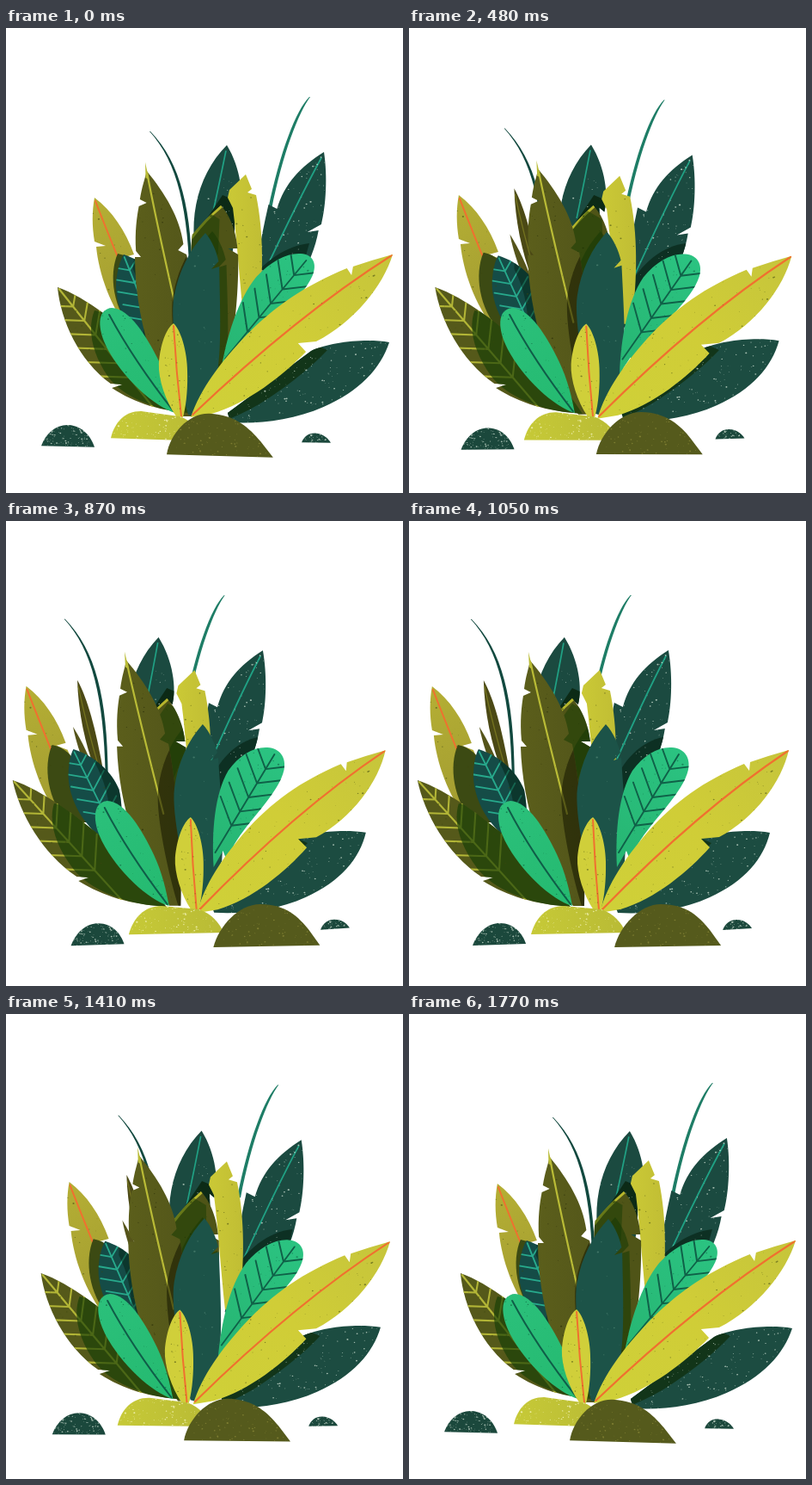
Write an HTML page with a canvas that moves like this. It is 462 px wide and 540 px high and loops after 1800 ms.

```html
<!DOCTYPE html>
<html lang="en">
<head>
<meta charset="utf-8">
<title>Swaying plant</title>
<style>
  html, body { margin: 0; width: 100%; height: 100%; overflow: hidden; background: #fff; }
  canvas { display: block; width: 462px; height: 540px; }
</style>
</head>
<body>
<canvas id="stage" width="462" height="540"></canvas>
<script>
const ctx = document.getElementById('stage').getContext('2d');
const LOOP = 1800, STEP = 30, REST = 0.955;
const shapes = [];

function random(seed) {
  return () => {
    seed = (seed * 1664525 + 1013904223) >>> 0;
    return seed / 4294967296;
  };
}

// Fine printed texture, spread over the bounding box of an outline.
function makeGrain(d, count, seed) {
  const rnd = random(seed), path = new Path2D();
  const n = d.match(/-?[\d.]+/g).map(Number);
  const xs = n.filter((_, i) => i % 2 === 0), ys = n.filter((_, i) => i % 2);
  const x0 = Math.min(...xs), y0 = Math.min(...ys);
  const w = Math.max(...xs) - x0, h = Math.max(...ys) - y0;
  for (let i = 0; i < count; i++) {
    const r = 0.35 + rnd() * rnd() * 0.9;
    const x = x0 + rnd() * w, y = y0 + rnd() * h;
    path.moveTo(x + r, y);
    path.ellipse(x, y, r, r * 0.8, 0, 0, 7);
  }
  return path;
}

// A midrib from tip to base with slanted side veins.
function ribs(x0, y0, x1, y1, count, left, right, spread = 0.8) {
  const a = Math.atan2(y0 - y1, x0 - x1);
  let d = `M${x0},${y0}L${x1},${y1}`;
  for (let i = 0; i < count; i++) {
    const t = 0.15 + i * 0.72 / count;
    const x = x0 + (x1 - x0) * t, y = y0 + (y1 - y0) * t;
    for (const [len, turn] of [[left, -spread], [right, spread]])
      d += `M${x},${y}L${x + len * Math.cos(a + turn)},${y + len * Math.sin(a + turn)}`;
  }
  return d;
}

// move: [top y, top shift, bottom y, bottom shift, lift, tilt, tilt centre]
function add(d, fill, move, extra = {}) {
  const s = { d, path: new Path2D(d), fill, move, ...extra };
  if (s.vein) s.veinPath = new Path2D(s.vein);
  if (s.grain) s.grainPath = makeGrain(d, s.grain, shapes.length * 977 + 31);
  (s.shade || []).forEach(h => h.path = new Path2D(h.d));
  shapes.push(s);
}

function blend(x0, y0, x1, y1, ...colors) {
  const g = ctx.createLinearGradient(x0, y0, x1, y1);
  colors.forEach((c, i) => g.addColorStop(i / (colors.length - 1), c));
  return g;
}

const LIGHT = 'rgba(225,240,225,.7)', DARK = 'rgba(60,70,15,.55)';
const teal = '#1b4a40', lime = '#b9bb36', orange = '#f0702f';

const center = 'M229,236C238,246 243,258 246,269L238,278L247,275C250,320 254,365 251,395L226,449' +
  'L219,447C208,412 192,340 196,310C200,280 212,255 229,236Z';

// Grass
add('M72,114C105,150 118,205 120,295L123,295C122,205 109,151 73,114Z',
  '#12493f', [115, 95, 295, 94, 6]);
add('M258,86C243,101 225,149 212,217L216,217C228,151 246,104 259,86Z',
  '#1e7d66', [86, 95, 216, 93, -6]);

// Back leaves
add('M155,290C134,230 145,172 181,135C198,162 202,195 197,213L191,208C194,245 190,270 182,290Z',
  teal, [135, 76, 290, 73, 1], {
    vein: 'M180,142Q174,175 165,220', veinFill: '#20a184', width: 1.7, grain: 45, speck: LIGHT,
    shade: [{ d: 'M170,224L190,194L204,200L204,245L160,250Z', fill: '#0c2a16', move: [194, 62, 250, 62] }]
  });
add('M302,150C307,178 306,212 301,234L285,243L298,241C292,280 268,320 240,350L216,350' +
  'C224,300 230,255 239,211L249,216C257,187 275,167 302,150Z',
  teal, [150, 68, 350, 63, -6], {
    vein: 'M299,157Q274,205 236,290', veinFill: '#20a184', width: 1.8, grain: 190, speck: LIGHT,
    shade: [{ d: 'M302,250C275,253 252,272 238,305L240,350L300,340Z', fill: '#0d3023', move: [250, 51, 350, 25] }]
  });
add('M222,173L203,191L201,200L207,212C212,250 215,300 220,345L236,345' +
  'C243,290 243,240 234,197L224,194L229,190Z',
  blend(200, 0, 243, 0, '#cbc936', '#c0bd34'), [174, 57, 330, 57, -3], { grain: 45, speck: DARK });
add('M190,206C205,222 210,245 211,256L200,256L212,263C214,300 212,350 203,400L180,400C165,340 154,270 158,240Q172,222 190,206Z',
  '#4f5417', [206, 60, 390, 54, 0], {
    vein: 'M157,243Q172,222 190,207', veinFill: '#b6b62c', width: 4.4, grain: 40, speck: 'rgba(20,40,5,.5)',
    shade: [
      { d: 'M160,255L190,212L208,222L212,262L196,300L200,400L160,400Z', fill: 'rgba(25,60,5,.5)', move: [212, 42, 400, 15] },
      { d: center, fill: 'rgba(22,58,5,.55)', move: [236, 29, 447, 21], offset: -18 }
    ]
  });

// Left cluster
add('M27,192C47,207 63,230 73,258L62,261L75,266C90,300 105,330 110,350L70,350' +
  'C45,318 32,280 29,249L40,248L27,243C24,225 24,208 27,192Z',
  blend(25, 200, 85, 320, '#b4ae34', '#a39d31'), [192, 76, 350, 76, 5], {
    vein: 'M28,196Q42,232 70,300', veinFill: orange, width: 2, grain: 45, speck: DARK
  });
add('M82,239C92,255 102,275 110,300L103,300C94,282 86,260 82,239Z', '#55541a', [239, 87, 300, 87, 1]);
add('M87,185C99,207 108,240 117,290L108,290C96,260 88,222 87,185Z', '#4b4915', [185, 87, 290, 87, 3], {
  vein: 'M88,192Q97,235 113,290', veinFill: '#74731f', width: 1.3
});
add('M57,260C70,262 82,272 90,290L98,350L75,350C52,325 46,285 57,260Z',
  '#3c4a13', [260, 73, 350, 73, 2], { grain: 15, speck: DARK });
add('M81,265C104,272 125,290 134,312C140,340 136,370 130,378C100,365 76,330 75,297C75,284 77,272 81,265Z',
  '#154c47', [265, 56, 378, 46, -2], {
    vein: ribs(82, 268, 132, 370, 5, 26, 26, 0.95), veinFill: '#27a98c', width: 1.8, grain: 25, speck: DARK,
    shade: [{ d: 'M105,265L140,270L140,380L120,380Q130,325 105,280Z', fill: 'rgba(5,35,20,.5)', move: [265, 44, 380, 35] }]
  });

// Tall leaf
add('M141,162C163,188 181,216 186,247L180,254L190,259C200,310 206,390 204,447L191,447' +
  'C156,405 132,330 130,262L137,262L131,255C129,232 131,215 133,203L142,199L134,195C136,180 139,172 141,162Z',
  blend(130, 0, 200, 0, '#5b5e1b', '#53561a'), [152, 23, 447, 15, 4], {
    vein: 'M140,157Q151,210 184,340', veinFill: lime, width: 2.2, grain: 60, speck: 'rgba(30,35,5,.5)',
    shade: [{ d: center, fill: 'rgba(25,28,3,.6)', move: [236, 20, 447, 10], offset: -18 }]
  });
add('M139,152L144,172L140,170Z', lime, [152, 23, 447, 15, 4]);

// Wide left leaf
add('M10,301C45,313 88,344 128,380C152,403 174,427 188,448C146,445 115,436 86,418L98,414L84,413' +
  'C44,386 18,340 10,301Z',
  '#55591a', [301, 50, 447, 34, 0], {
    vein: ribs(12, 303, 136, 440, 6, 38, 42, 0.8), veinFill: '#b2b536', width: 2.1, grain: 70, speck: DARK,
    shade: [{ d: 'M58,328C51,350 60,378 80,404C102,432 150,446 190,450L192,400L120,340Z',
      fill: 'rgba(20,62,5,.65)', move: [328, 45, 450, 34] }]
  });

// Middle and right leaves
add(center, '#1c5348', [236, 3, 447, -7, 2], { grain: 25, speck: 'rgba(110,160,140,.45)' });
add('M306,263C321,264 328,275 325,289C319,316 284,346 266,376L258,396L253,383L242,402' +
  'C240,360 244,317 260,290C273,272 290,262 306,263Z',
  blend(250, 390, 315, 265, '#27b673', '#2bc381'), [263, 37, 400, 8, -1], {
    vein: ribs(314, 271, 244, 385, 5, 36, 38, 0.9), veinFill: '#0f6148', width: 1.9, grain: 70, speck: 'rgba(10,80,55,.5)'
  });
add('M420,362C413,392 390,419 350,437C315,453 275,457 243,455L239,444L330,372C350,362 392,357 420,362Z',
  '#1c4c41', [362, 26, 455, 18, 3], {
    grain: 230, speck: LIGHT,
    shade: [{ d: 'M352,374C335,392 312,411 282,431Q262,444 240,453L220,440L320,360Z',
      fill: '#123519', move: [374, 22, 453, 22] }]
  });
add('M442,266C434,302 403,345 361,367L340,369L350,379C326,406 287,439 246,451L222,455' +
  'C231,421 252,391 277,362C309,326 343,302 390,282L396,290L397,280Q420,272 442,266Z',
  blend(230, 450, 440, 270, '#cfd038', '#d0cd37', '#c6c53b'), [266, 8, 455, -7, -3], {
    vein: 'M441,267Q336,337 224,452', veinFill: orange, width: 2.2, grain: 170, speck: DARK
  });

// Front leaves
add('M118,325C139,326 158,358 172,387C182,408 187,430 190,447C166,440 130,407 112,372C101,350 100,327 118,325Z',
  blend(105, 330, 185, 440, '#2bc07b', '#25ba70'), [325, 5, 447, 7, 0], {
    vein: 'M115,333Q142,385 188,445', veinFill: '#0f5e48', width: 2, grain: 55, speck: 'rgba(10,80,50,.6)'
  });
add('M214,344C224,354 230,382 229,404C229,425 226,443 223,453L215,452C203,434 195,409 196,391C198,369 205,350 214,344Z',
  '#d0cf3a', [344, -19, 453, -17, -1], {
    vein: 'M214,347Q216,400 221,452', veinFill: orange, width: 2, grain: 40, speck: DARK
  });

// Stones
add('M142,480C147,461 160,447 180,447L224,451C238,456 248,467 252,478Z',
  blend(145, 0, 250, 0, '#c6c937', '#b9bb35'), [447, -21, 480, -20, -1, 0.05, 197], { grain: 110, speck: 'rgba(250,250,200,.75)' });
add('M239,495C245,470 269,445 293,445C323,445 338,460 350,475L363,493Z',
  '#555a1c', [445, -56, 495, -52, 3, 0.045, 300], { grain: 110, speck: 'rgba(165,160,70,.5)' });
add('M74,493C80,477 92,467 106,467C122,467 132,479 136,491Z',
  '#1b483c', [467, -33, 493, -33, -6, 0.06, 105], { grain: 130, speck: LIGHT });
add('M365,475C368,467 374,463 381,463C390,463 396,468 399,473Z',
  '#1b483c', [463, -21, 475, -21, 7.5, 0.07, 382], { grain: 45, speck: LIGHT });

// Cubic ease with handles at half length
function ease(u) {
  let lo = 0, hi = 1;
  for (let i = 0; i < 24; i++) {
    const t = (lo + hi) / 2;
    if (1.5 * t * (1 - t) + t * t * t < u) lo = t; else hi = t;
  }
  return lo * lo * (3 - 2 * lo);
}

function place([yt, top, yb, bottom, lift = 0, tilt = 0, xc = 0], q, offset = 0) {
  const k = (top - bottom) / (yt - yb) * q;
  ctx.setTransform(1, tilt * q, k, 1, bottom * q - k * yb + offset, (lift - tilt * xc) * q);
}

function paint(s, q) {
  ctx.save();
  place(s.move, q);
  ctx.fillStyle = s.fill;
  ctx.fill(s.path);
  ctx.clip(s.path);
  if (s.veinPath) {
    ctx.strokeStyle = s.veinFill;
    ctx.lineWidth = s.width;
    ctx.lineCap = 'round';
    ctx.stroke(s.veinPath);
  }
  for (const h of s.shade || []) {
    place(h.move, q, h.offset);
    ctx.fillStyle = h.fill;
    ctx.fill(h.path);
  }
  if (s.grainPath) {
    place(s.move, q);
    ctx.fillStyle = s.speck;
    ctx.fill(s.grainPath);
  }
  ctx.restore();
}

const start = performance.now();

function frame() {
  const t = Math.floor((performance.now() - start) % LOOP / STEP) * STEP;
  const q = 1 - ease(1 - Math.abs(t / (LOOP / 2) - 1)) / REST;
  ctx.setTransform(1, 0, 0, 1, 0, 0);
  ctx.fillStyle = '#fff';
  ctx.fillRect(0, 0, 462, 540);
  shapes.forEach(s => paint(s, q));
  requestAnimationFrame(frame);
}
frame();
</script>
</body>
</html>
```
